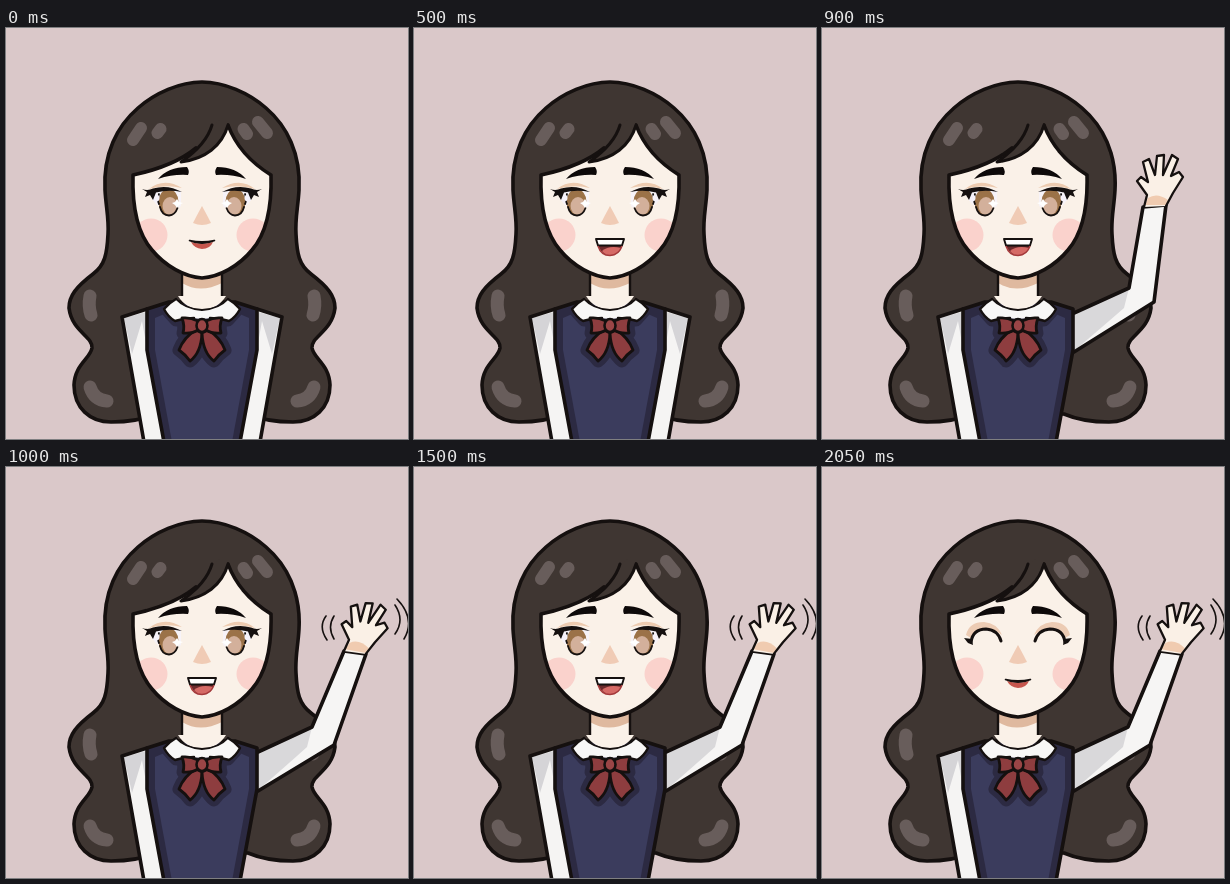
Recreate the animation shown at these times as an HTML page. Size 402 px wide and 411 px high, loop 2250 ms.

```html
<!DOCTYPE html>
<html lang="en">
<head>
<meta charset="utf-8">
<title>Waving girl</title>
<style>
html, body { margin: 0; width: 100%; height: 100%; overflow: hidden; background: #dac8c9; }
svg { display: block; width: 100vw; height: 100vh; }
.ink { stroke: #15100f; stroke-width: 3.6; stroke-linejoin: round; stroke-linecap: round; }
.line { fill: none; }
.shine { fill: none; stroke: #685d5b; stroke-linecap: round; }
.shadow { fill: #2c2a42; stroke: #2c2a42; stroke-width: 13; stroke-linejoin: round; }
</style>
</head>
<body>
<svg viewBox="0 0 402 411" preserveAspectRatio="none">
  <defs>
    <path id="faceShape" d="M222 97C229 116 244 134 265 147C266 182 259 207 246 222C233 238 213 249 196 250C179 249 159 238 146 222C133 207 126 182 127 147C150 142 172 135 190 120"/>
    <clipPath id="faceClip"><use href="#faceShape"/></clipPath>
    <path id="vestShape" d="M141 281L163 274H229L251 281V322L234 414H158L141 322Z"/>
    <clipPath id="vestClip"><use href="#vestShape"/></clipPath>
    <path id="tail" d="M190 302Q178 309 173 322Q180 327 184 333Q195 325 196 305Z"/>
    <path id="loop" d="M192 293Q184 289 176 290Q179 298 177 305Q186 306 192 302Z"/>
    <path id="handShape" d="M-11 1L-8 -11L-18 -25L-14 -29L-7 -24L-12 -44L-6 -47L0 -31L2 -50L9 -51L8 -31L17 -51L23 -47L16 -30L24 -34L28 -29L18 -13L11 0"/>

    <g id="armDown">
      <path d="M116 289L141 281V322L158 414H138Z" fill="#f5f4f3"/>
      <path d="M118 290L140 284V315L136 293L126 326Z" fill="#d5d4d7"/>
      <path class="ink line" d="M141 281L116 289L138 414"/>
    </g>

    <g id="eyeOpen">
      <path d="M144 163Q160 157 175 163V178Q167 184 157 181Q147 177 144 163Z" fill="#f7f3f8"/>
      <path d="M143 161Q158 149 176 160Q160 156 143 161Z" fill="#edcbb0"/>
      <ellipse cx="162.500" cy="174" rx="10" ry="13" fill="#9b7248"/>
      <ellipse cx="164" cy="178" rx="7.500" ry="9" fill="#d3b09b"/>
      <path d="M154 179Q156 187.500 163 187.500Q169 187 171.500 180M153 166Q151 172 153 176" class="ink line" style="stroke-width:1.8"/>
      <path d="M171 171L173 174L177 175L173 177L171 180L169 177L166 175L169 174Z" fill="#fff"/>
      <circle cx="150" cy="170" r="3.500" fill="#f6f2fa"/>
      <path d="M136 161Q142 163 147 160.500Q162 156 176 164Q162 161.500 150 164.500L147 172L144 167L139 169L141 164Z" fill="#15100f"/>
    </g>

    <g id="eyeShut">
      <path d="M144 168Q147 155 162 155Q175 156 180 168Q162 155 149 171Z" fill="#eccbb3"/>
      <path d="M149 175Q151 162 164 162Q176 163 179 174" class="ink line" style="stroke-width:3"/>
      <path d="M142 171L150 172L151 178L146 176Z" fill="#15100f"/>
    </g>

    <g id="shines">
      <path class="shine" stroke-width="13" d="M84 268Q82 278 85 287"/>
      <path class="shine" stroke-width="13" d="M84 359Q88 372 101 373"/>
    </g>

    <g id="cheek">
      <circle cx="145" cy="207" r="16.500" fill="#fad2cc"/>
      <path d="M152 151Q162 139 181 139Q184 143 182 147Q167 146 152 151Z" fill="#0d0909"/>
    </g>

    <g id="collarHalf">
      <path fill="#f8f7f6" d="M170 271Q163 275 158 281Q162 289 169 293Q180 289 196 291V282Q179 281 170 271Z"/>
      <path class="ink line" style="stroke-width:2.4" d="M170 271Q163 275 158 281Q162 289 169 293Q178 290 188 290"/>
      <path class="ink line" style="stroke-width:1.8" d="M170 271Q179 281 196 282"/>
    </g>

    <g id="bowShadow" class="shadow"><use href="#tail"/><use href="#loop"/></g>
    <g id="bowHalf" class="ink" fill="#8e3d3f" style="stroke-width:2.8">
      <use href="#tail"/>
      <use href="#loop"/>
    </g>
  </defs>

  <path fill="#dac8c9" d="M0 0H402V411H0Z"/>

  <path id="hair" class="ink" fill="#3f3632"/>
  <use href="#shines"/>
  <use href="#shines" class="flip"/>
  <path class="shine" stroke-width="12" d="M135 100L127 112M154.500 101L151.500 105M237.500 101L241 106M252 94L261 105"/>

  <path d="M176 243V270Q183 281 196 282Q209 281 216 270V243Z" fill="#faf1e8"/>
  <path d="M176 243V255Q194 266 216 255V243Z" fill="#dfb99f"/>
  <path class="ink line" style="stroke-width:2.4" d="M176 246V271M216 246V271"/>

  <use href="#armDown"/>
  <g id="rest"><use href="#armDown" class="flip"/></g>
  <g id="raised">
    <path id="sleeve" fill="#f6f5f4"/>
    <path id="shade" fill="#d9d8da"/>
    <path id="seam" class="ink line"/>
    <g id="hand">
      <use href="#handShape" fill="#faf0e6"/>
      <path fill="#f0cbb0" d="M-10 -1L-7 -8Q2 -14 13 -6L11 -1Z"/>
      <use href="#handShape" class="ink line" style="stroke-width:2.3"/>
    </g>
    <path id="swish" class="ink line" style="stroke-width:1.6"/>
  </g>

  <use href="#vestShape" fill="#2c2a42"/>
  <path fill="#3b3c5d" d="M149 290L163 284H229L243 290V322L226 414H166L149 322Z"/>
  <g clip-path="url(#vestClip)">
    <use href="#bowShadow"/>
    <use href="#bowShadow" class="flip"/>
    <path class="shadow" d="M162 283L170 292H222L230 283Z"/>
  </g>
  <use href="#vestShape" class="ink line"/>
  <path d="M172 268H220Q212 281 196 282Q180 281 172 268Z" fill="#faf1e8"/>
  <use href="#collarHalf"/>
  <use href="#collarHalf" class="flip"/>
  <use href="#bowHalf"/>
  <use href="#bowHalf" class="flip"/>
  <ellipse class="ink" style="stroke-width:2.6" cx="196" cy="297.500" rx="5.500" ry="6.500" fill="#9a4546"/>

  <g clip-path="url(#faceClip)">
    <path d="M120 90H270V255H120Z" fill="#faf1e8"/>
    <use href="#cheek"/>
    <use href="#cheek" class="flip"/>
  </g>
  <use href="#faceShape" class="ink line"/>
  <path fill="#3f3632" d="M206 97C202 111 191 123 175 134C199 131 216 118 222 97L216 90Z"/>
  <path class="ink line" style="stroke-width:3" d="M206 97C202 111 191 123 175 134C199 131 216 118 222 97"/>

  <path d="M196 178Q201 187 205 195Q196 199 187 195Q191 187 196 178Z" fill="#f0cbb5"/>

  <g id="open"><use href="#eyeOpen"/><use href="#eyeOpen" class="flip"/></g>
  <g id="shut"><use href="#eyeShut"/><use href="#eyeShut" class="flip"/></g>

  <g id="smile">
    <path d="M185 214Q196 217 207 214Q204 221 196 221Q188 220 185 214Z" fill="#c5564d"/>
    <path class="ink" style="stroke-width:1.6" d="M183.500 212.500Q196 215 208.500 212.500Q196 218 183.500 212.500Z"/>
  </g>
  <g id="talk">
    <path d="M183 214H209Q207 227 196 227.500Q185 226 183 214Z" fill="#6b292b"/>
    <path d="M188 223Q195 217 207 220Q203 227.500 196 227.500Q191 227 188 223Z" fill="#d56a66"/>
    <path class="ink" style="stroke-width:1.9" fill="#fff" d="M182 211H210L208 217.500H184Z"/>
    <path d="M184 218Q187 227.500 196 227.500Q205 227 208 218" fill="none" stroke="#a53a3c" stroke-width="1.5"/>
  </g>
</svg>
<script>
const el = id => document.getElementById(id);
const show = (id, on) => el(id).setAttribute('display', on ? 'inline' : 'none');
const draw = (id, d) => el(id).setAttribute('d', d);

document.querySelectorAll('.flip').forEach(u => u.setAttribute('transform', 'matrix(-1 0 0 1 392 0)'));

// Left half of the hair as cubic segments; the right half is its reflection.
const curve = [
  [196, 54], [174, 54], [149, 65], [132, 80], [111, 98], [97, 126], [99, 162],
  [100, 180], [103, 190], [102, 206], [101, 226], [99, 237], [87, 246],
  [70, 259], [63, 268], [63, 280], [66, 304], [87, 308], [86, 320],
  [84, 331], [69, 336], [68, 357], [68, 380], [84, 394], [105, 394],
  [120, 394], [136, 392], [150, 386]
];
const right = curve.map(([x, y]) => [392 - x, y]).reverse();
draw('hair', `M${curve[0]}C${curve.slice(1).join(' ')}L${right[0]}C${right.slice(1).join(' ')}Z`);

const arcs = {
  none: '',
  out: 'M328 149Q321 160 328 172M320 149Q312 160 321 173M389 138Q399 153 389 167M391 132Q410 152 398 172',
  in: 'M320 112Q336 121 334 141M319 104Q345 114 342 143'
};
const up =   { elbow: [307, 260], wrist: [321, 179, 344, 177], tip: [332, 274], hand: [333, 178, 0], arcs: 'none' };
const away = { elbow: [306, 260], wrist: [338, 184, 360, 187], tip: [328, 278], hand: [349, 185, 10], arcs: 'out' };
const near = { elbow: [306, 260], wrist: [300, 173, 320, 169], tip: [338, 270], hand: [309.5, 171, -17], arcs: 'in' };

const steps = [
  { end: 500, arm: null, talk: false, shut: false },
  { end: 750, arm: null, talk: true, shut: false },
  { end: 1000, arm: up, talk: true, shut: false },
  { end: 1250, arm: away, talk: true, shut: false },
  { end: 1500, arm: near, talk: true, shut: false },
  { end: 1750, arm: away, talk: true, shut: false },
  { end: 2250, arm: away, talk: false, shut: true }
];

function setArm({ elbow, wrist, tip, hand, arcs: kind }) {
  const edge = `M252 285L${elbow}L${wrist}L${tip}L252 324`;
  draw('sleeve', edge + 'Z');
  draw('shade', `M252 286L${elbow}L${elbow[0] - 5} ${elbow[1] + 20}Q272 306 252 323Z`);
  draw('seam', edge);
  draw('swish', arcs[kind]);
  el('hand').setAttribute('transform', `translate(${hand[0]} ${hand[1]}) rotate(${hand[2]})`);
}

let current;
function render(ms) {
  const step = steps.find(s => ms < s.end);
  if (step === current) return;
  current = step;
  show('rest', !step.arm);
  show('raised', step.arm);
  show('talk', step.talk);
  show('smile', !step.talk);
  show('open', !step.shut);
  show('shut', step.shut);
  if (step.arm) setArm(step.arm);
}

const start = performance.now();
function tick() {
  render((performance.now() - start) % 2250);
  requestAnimationFrame(tick);
}
tick();
</script>
</body>
</html>
```
